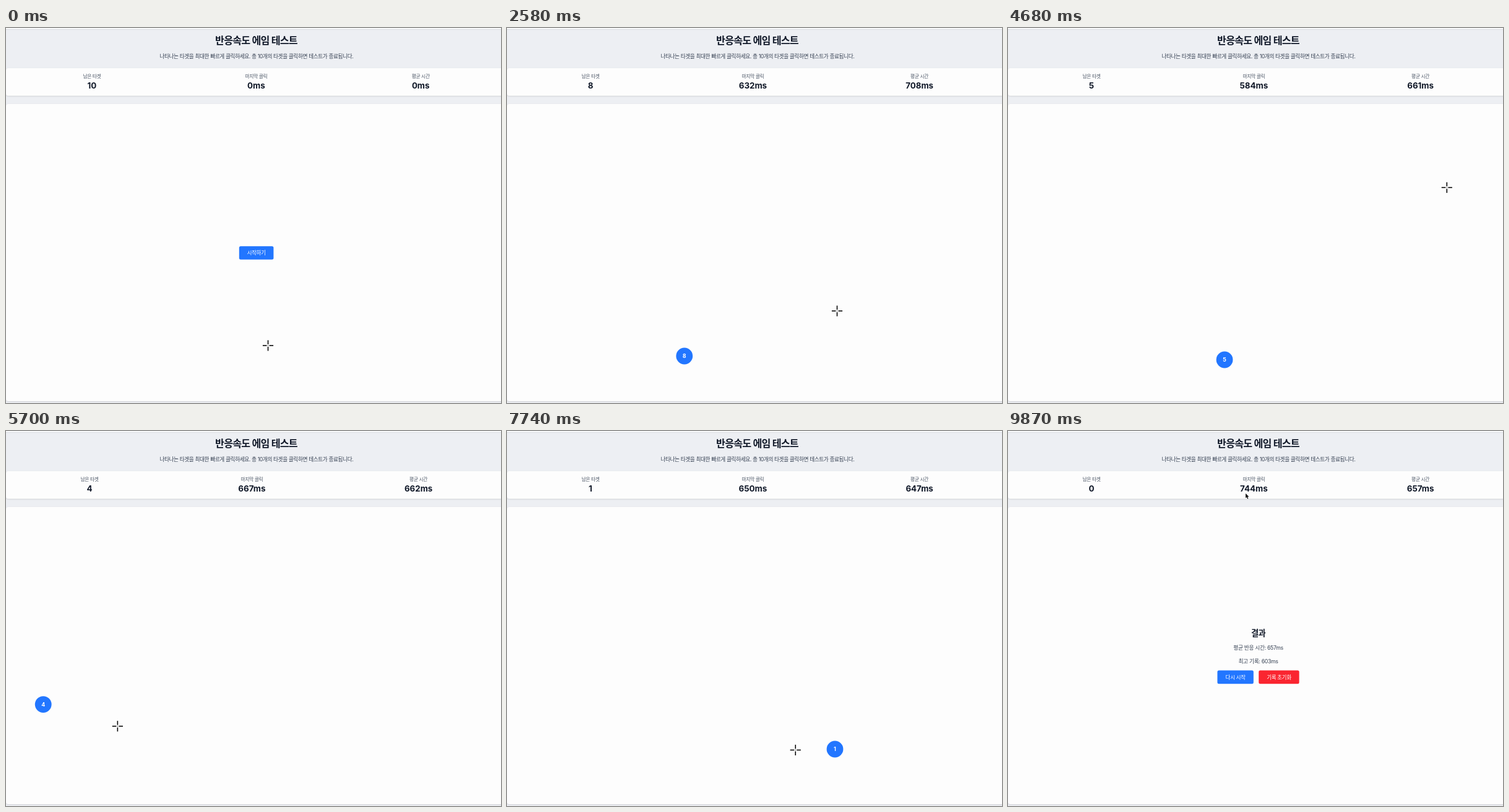
Recreate the animation shown at these times as an HTML page with a canvas. Size 800x607 px, loop 9900 ms.

```html
<!DOCTYPE html>
<html lang="ko">
<head>
<meta charset="utf-8">
<title>반응속도 에임 테스트</title>
<style>
  html, body { margin: 0; width: 100%; height: 100%; overflow: hidden; background: #edeff3; }
  canvas { display: block; width: 800px; height: 607px; }
</style>
</head>
<body>
<canvas id="stage" width="800" height="607"></canvas>
<script>
const ctx = document.getElementById('stage').getContext('2d');
const LOOP = 9900, STEP = 30;
const FONT = 'Inter, "Noto Sans CJK KR", "Noto Sans CJK", sans-serif';
const BLUE = '#2276ff', RED = '#fa2530', INK = '#101828', BODY = '#364153', GRAY = '#4a5565';
const CENTER = 404.5;

// Each round: reaction time (ms) and target centre
const START = 690, PACE = 1.1822, RADIUS = 13.4;
const rounds = [
  [784, 240, 220], [632, 640, 371], [693, 286.7, 531], [612, 467.3, 439.3], [584, 705, 260],
  [667, 350, 537], [617, 60.2, 442.6], [587, 292.5, 217.8], [650, 456.2, 519], [744, 530, 515]
];
let total = 0;
const sums = rounds.map(([ms]) => total += ms);
const clicks = sums.map(s => START + s * PACE);

// The pointer settles on each target before the click and leaves shortly after it
const SETTLE = 230, LEAVE = 70, AIM = [5, -2.3];
const path = [
  [0, 423.5, 514], [150, 501, 470], [450, 393, 363], [START + 120, 393, 363],
  [2580, 533.5, 458],
  [8580, 514.5, 431.5], [8820, 505, 396], [9080, 455, 310], [9330, 345, 350],
  [9600, 440, 391], [9869, 443, 393], [9870, 384, 101], [LOOP, 384, 101]
];
rounds.forEach(([, x, y], i) => {
  for (const dt of [-SETTLE, LEAVE]) path.push([clicks[i] + dt, x + AIM[0], y + AIM[1]]);
});
path.sort((a, b) => a[0] - b[0]);

const smooth = u => u * u * (3 - 2 * u);
const secant = (i, a) => (path[i + 1][a] - path[i][a]) / (path[i + 1][0] - path[i][0]);

function slope(i, a) {
  if (i === 0 || i === path.length - 1) return 0;
  const p = secant(i - 1, a), q = secant(i, a);
  return p * q > 0 ? 2 * p * q / (p + q) : 0;
}

// Monotone cubic interpolation between path points
function pointer(t) {
  let i = 0;
  while (i < path.length - 2 && path[i + 1][0] <= t) i++;
  const h = path[i + 1][0] - path[i][0], u = (t - path[i][0]) / h, s = smooth(u);
  return [1, 2].map(a =>
    path[i][a] * (1 - s) + path[i + 1][a] * s +
    h * u * (1 - u) * ((1 - u) * slope(i, a) - u * slope(i + 1, a)));
}

function text(str, x, y, size, weight, color, spacing = -0.045) {
  ctx.font = `${weight} ${size}px ${FONT}`;
  ctx.letterSpacing = size * spacing + 'px';
  ctx.textAlign = 'center';
  ctx.fillStyle = color;
  ctx.fillText(str, x, y);
}

function box(x, y, w, h, r, color) {
  ctx.fillStyle = color;
  ctx.beginPath();
  ctx.roundRect(x, y, w, h, r);
  ctx.fill();
}

function card(y, h) {
  ctx.save();
  ctx.shadowColor = 'rgba(0,0,0,.15)';
  ctx.shadowBlur = 2;
  ctx.shadowOffsetY = 0.8;
  box(0, y, 812, h, 3.5, '#fdfdfd');
  ctx.restore();
}

const BUTTON_H = 21.6;
const startButtons = [{ x: 376.8, y: 353.2, w: 55.6, color: BLUE, label: '시작하기' }];
const endButtons = [
  { x: 338.4, y: 387.6, w: 58.4, color: BLUE, label: '다시 시작' },
  { x: 405.2, y: 387.6, w: 65.4, color: RED, label: '기록 초기화' }
];

function button(b) {
  box(b.x, b.y, b.w, BUTTON_H, 2.5, b.color);
  text(b.label, b.x + b.w / 2, b.y + 14, 8.6, 500, '#fff');
}

function stat(label, value, x) {
  text(label, x, 81, 7.75, 400, GRAY);
  text(String(value), x, 97.7, 13.35, 700, INK, 0);
}

function stats(done) {
  const last = done ? rounds[done - 1][0] : 0;
  const mean = done ? Math.round(sums[done - 1] / done) : 0;
  stat('남은 타겟', 10 - done, done ? 135 : 138.9);
  stat('마지막 클릭', last + 'ms', done ? 397.4 : 404.4);
  stat('평균 시간', mean + 'ms', done ? 666.6 : 670.2);
}

function target(n, t) {
  const [, x, y] = rounds[n];
  const hover = smooth(Math.min(1, Math.max(0, (t - clicks[n] + SETTLE) / 150)));
  ctx.save();
  ctx.translate(x, y);
  ctx.scale(1 + 0.1 * hover, 1 + 0.1 * hover);
  ctx.fillStyle = BLUE;
  ctx.beginPath();
  ctx.arc(0, 0, RADIUS, 0, Math.PI * 2);
  ctx.fill();
  text(String(10 - n), 0, 3.2, 8.9, 700, '#fff', 0);
  ctx.restore();
}

function results() {
  text('결과', CENTER, 331.8, 13.2, 700, INK);
  text('평균 반응 시간: 657ms', CENTER, 354, 8.7, 400, BODY, -0.035);
  text('최고 기록: 603ms', CENTER, 375.5, 8.7, 400, BODY, -0.035);
  endButtons.forEach(button);
}

function crosshair() {
  for (const [color, grow] of [['rgba(255,255,255,.85)', 0.6], ['#080808', 0]]) {
    ctx.fillStyle = color;
    for (let i = 0; i < 4; i++) {
      ctx.fillRect(2 - grow, -0.8 - grow, 6.6 + 2 * grow, 1.6 + 2 * grow);
      ctx.rotate(Math.PI / 2);
    }
    ctx.fillRect(-0.5, -0.5, 1, 1);
  }
}

const arrowShape = new Path2D('M0 0V7.6L1.8 6L3 9L4.3 8.4L3.1 5.6L5.5 5.5Z');

function arrow() {
  ctx.lineJoin = 'round';
  ctx.lineWidth = 1.3;
  ctx.strokeStyle = '#fff';
  ctx.stroke(arrowShape);
  ctx.fillStyle = '#080808';
  ctx.fill(arrowShape);
}

function cursor(t, buttons) {
  const [x, y] = pointer(t);
  const over = buttons.some(b => x > b.x && x < b.x + b.w && y > b.y && y < b.y + BUTTON_H);
  ctx.save();
  ctx.translate(x, y);
  if (over || y < 123) arrow();
  else crosshair();
  ctx.restore();
}

function header() {
  box(0, 0, 800, 607, 0, '#edeff3');
  box(0, 0, 800, 2, 0, '#fafbfc');
  box(0, 2, 800, 1, 0, '#d9dce1');
  text('반응속도 에임 테스트', CENTER, 26, 16.1, 700, INK);
  text('나타나는 타겟을 최대한 빠르게 클릭하세요. 총 10개의 타겟을 클릭하면 테스트가 종료됩니다.',
    CENTER + 0.4, 48.5, 8.66, 400, BODY);
}

function draw(t) {
  const done = clicks.filter(c => c <= t).length;
  header();
  card(65, 44.8);
  card(123, 481);
  stats(done);
  if (t < START) startButtons.forEach(button);
  else if (done < rounds.length) target(done, t);
  else results();
  cursor(t, t < START ? startButtons : done === rounds.length ? endButtons : []);
}

const origin = performance.now();
function tick() {
  const t = (performance.now() - origin) % LOOP;
  draw(Math.floor(t / STEP) * STEP);
  requestAnimationFrame(tick);
}
tick();
</script>
</body>
</html>
```
